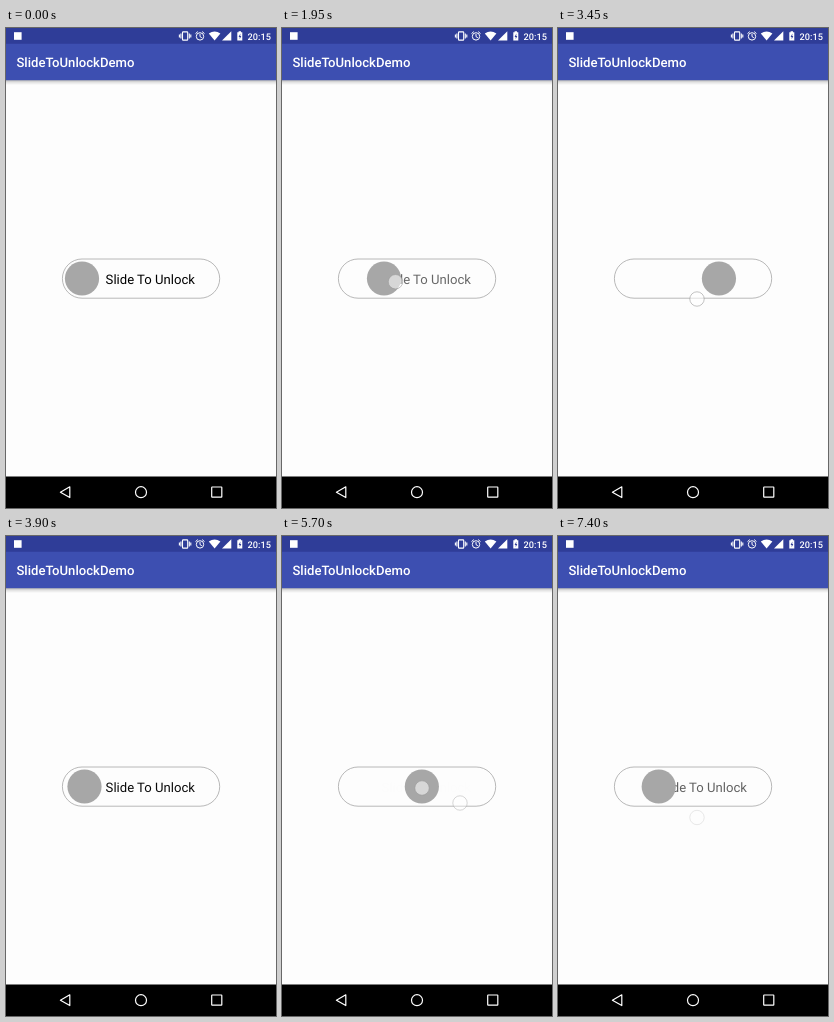
An HTML page that plays this animation: 270x480 px, repeating every 7.45 s.

```html
<!DOCTYPE html>
<html lang="en">
<head>
<meta charset="utf-8">
<title>SlideToUnlockDemo</title>
<style>
  html, body { margin: 0; width: 100%; height: 100%; overflow: hidden; background: #fdfdfd; }
  svg { display: block; width: 100%; height: 100%; }
  text { font-family: Roboto, Arial, sans-serif; font-size: 13.12px; text-rendering: geometricPrecision; }
  .medium { font-weight: 500; fill: #fff; }
  .line { fill: none; stroke: #fff; }
</style>
</head>
<body>
<svg viewBox="0 0 270 480">
  <defs>
    <linearGradient id="shade" x2="0" y2="1">
      <stop offset="0" stop-color="#000" stop-opacity=".3"/>
      <stop offset=".4" stop-color="#000" stop-opacity=".12"/>
      <stop offset="1" stop-color="#000" stop-opacity="0"/>
    </linearGradient>
  </defs>
  <rect width="270" height="480" fill="#fdfdfd"/>

  <rect y="52" width="270" height="5" fill="url(#shade)"/>
  <rect y="15" width="270" height="37.2" fill="#3d4fb1"/>
  <rect width="270" height="15.75" fill="#2f3d98"/>
  <text class="medium" x="10.4" y="39.3">SlideToUnlockDemo</text>

  <g fill="#fff">
    <rect x="8" y="4.2" width="7.6" height="7.6"/>
    <!-- vibrate -->
    <g class="line" stroke-width="1.1">
      <rect x="176.5" y="3.9" width="5.2" height="8.2" rx=".7"/>
      <path d="M174.9 5.4v5.2M173.4 6.6v2.8M183.3 5.4v5.2M184.8 6.6v2.8"/>
    </g>
    <!-- alarm -->
    <g class="line" stroke-width="1">
      <circle cx="194" cy="8.4" r="3.7"/>
      <path d="M194 6v2.6l1.8 1.1M189.5 5.6l2.3-2M198.5 5.6l-2.3-2"/>
    </g>
    <path d="M202.8 5.4Q208.6 1.8 214.4 5.4L208.6 12.6Z"/>
    <path d="M216 12.5L225.3 3.2V12.5Z"/>
    <path d="M231.3 4.3H232.6V3.3H235V4.3H236.3V12.6H231.3Z"/>
    <path d="M234.4 5.4L232.6 8.9H233.7V11.3L235.3 7.9H234.2Z" fill="#2f3d98"/>
  </g>
  <text class="medium" x="241.6" y="11.7" style="font-size:9.2px">20:15</text>

  <rect x="56.4" y="231" width="157.3" height="39.2" rx="19.6" fill="none" stroke="#a6a6a6" stroke-width=".8"/>
  <text id="label" x="99.6" y="255.5">Slide To Unlock</text>
  <circle id="knob" cx="76" cy="250.5" r="17.1" fill="#a7a7a7"/>
  <g id="dots" fill="#fff" fill-opacity=".55" stroke="#999" stroke-opacity=".65" stroke-width=".9"></g>

  <rect y="448.5" width="270" height="31.5"/>
  <g class="line" stroke-width="1.2">
    <path d="M63.8 458.8V469.6L54.4 464.2Z" stroke-linejoin="round"/>
    <circle cx="135" cy="464.2" r="5.5"/>
    <rect x="205.7" y="459" width="10.1" height="10.1" rx=".4"/>
  </g>
</svg>
<script>
const LOOP = 7450, STEP = 50;
const REST = 76, END = 194, SLOP = 9.5;
const FADE = 190, SNAP = 400, RESET = 640;

// Each finger moves from one point to the other while it is down.
const touch = (down, up, from, to, power = 1) => ({ down, up, from, to, power });
const touches = [
  touch(500, 1000, [78, 256], [162, 266]),
  touch(1700, 2700, [78, 247], [220, 274]),
  touch(3353, 3530, [139, 271], [139, 271]),
  touch(4200, 4485, [78, 262], [127, 275]),
  touch(4950, 5636, [78, 252], [178, 267]),
  touch(5700, 6700, [140, 252], [222, 276], 1.4),
  touch(7053, 7280, [139, 281.5], [139, 281.5])
];

const label = document.getElementById("label");
const knob = document.getElementById("knob");
const dots = document.getElementById("dots");

const clamp = (v, lo = 0, hi = 1) => Math.max(lo, Math.min(hi, v));
const mix = (a, b, u) => a + (b - a) * u;
const set = (el, attrs) => Object.entries(attrs).forEach(([k, v]) => el.setAttribute(k, v));

for (const g of touches) {
  g.dot = document.createElementNS("http://www.w3.org/2000/svg", "circle");
  set(g.dot, { r: 7.2 });
  dots.append(g.dot);
}

function finger(g, t) {
  const u = clamp((t - g.down) / (g.up - g.down)) ** g.power;
  return g.from.map((v, i) => mix(v, g.to[i], u));
}

function settle(s, t) {
  const u = clamp((t - s.at) / s.span);
  return mix(s.to, s.from, (1 - u) ** 2);
}

// A drag pulls the knob; short of the end it snaps back, at the end a tap resets it.
function knobAt(t) {
  let s = { from: REST, to: REST, at: 0, span: SNAP };
  for (const g of touches) {
    if (t < g.down) break;
    const x0 = settle(s, g.down);
    if (x0 === END) {
      s = { from: END, to: REST, at: g.down, span: RESET };
      continue;
    }
    const pull = Math.max(0, finger(g, t)[0] - g.from[0] - SLOP);
    const x = clamp(x0 + pull, REST, END);
    if (t < g.up) return x;
    s = { from: x, to: x < END ? REST : END, at: g.up, span: SNAP };
  }
  return settle(s, t);
}

function draw(t) {
  const x = knobAt(t);
  set(knob, { cx: x });
  set(label, { opacity: clamp(1 - (x - REST) / 64) });
  for (const g of touches) {
    const [cx, cy] = finger(g, t);
    const opacity = t < g.down ? 0 : clamp(1 - (t - g.up) / FADE);
    set(g.dot, { cx, cy, opacity });
  }
}

const start = performance.now();
function tick() {
  const t = (performance.now() - start) % LOOP;
  draw(Math.floor(t / STEP) * STEP);
  requestAnimationFrame(tick);
}
tick();
</script>
</body>
</html>
```
